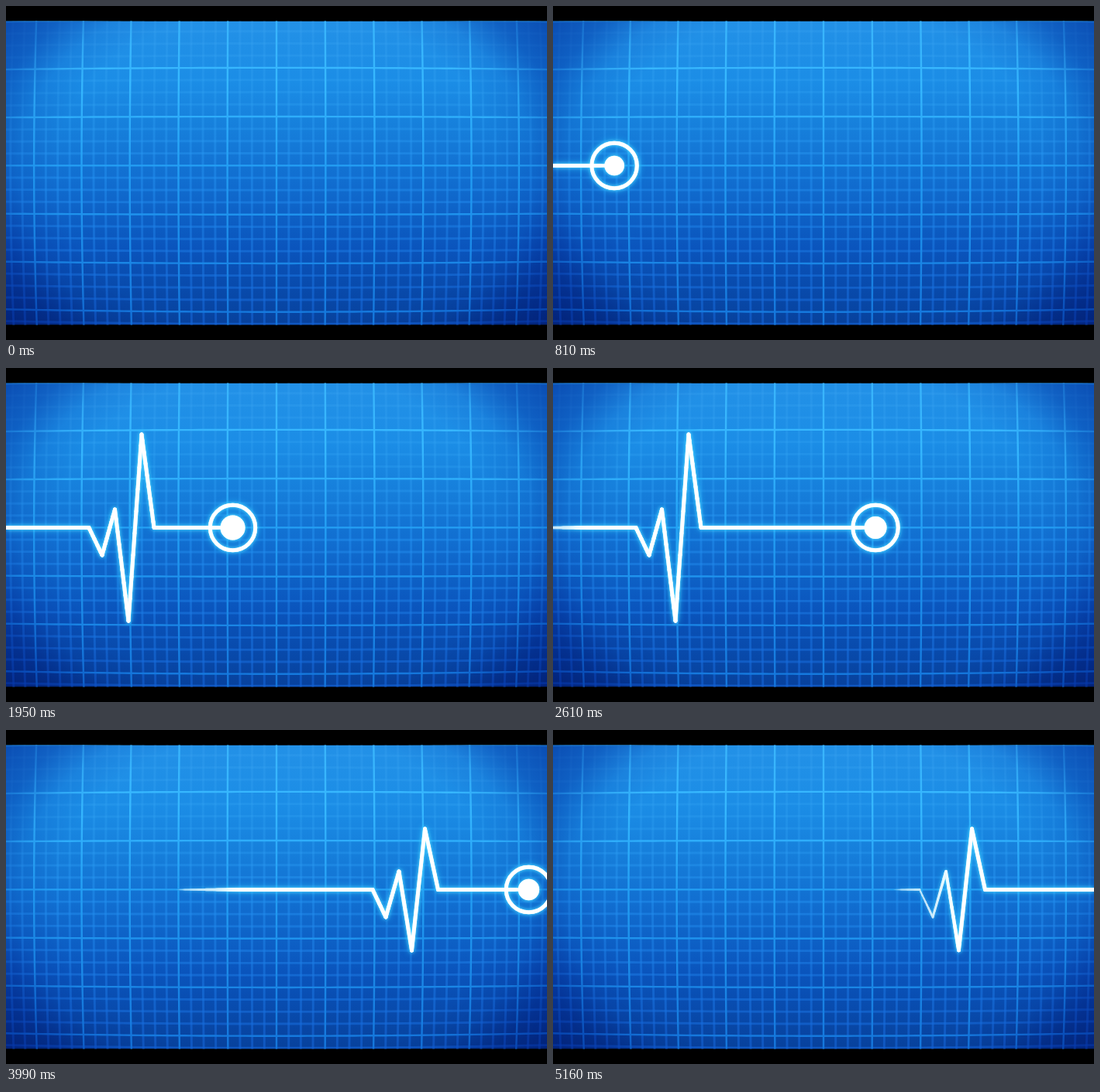
Write an HTML page with a canvas that moves like this. It is 698x432 px and loops after 5190 ms.

```html
<!DOCTYPE html>
<html lang="en">
<head>
<meta charset="utf-8">
<title>Heartbeat monitor</title>
<style>
  html, body { margin: 0; width: 100%; height: 100%; overflow: hidden; background: #000; }
  canvas { display: block; }
</style>
</head>
<body>
<canvas id="stage" width="698" height="432"></canvas>
<script>
const W = 698, H = 432, TOP = 19.5, BOTTOM = 412.5;
const LOOP = 5190, STEP = 30;
const SPEED = 0.1872, START = -72.5, TRAIL = 455;
const CX = 349, CY = 206.4, CELL = 63.4;
const BASE = 206.5, STROKE = 4.9, TAPER = 90;

const TRACE = [
  [-120, BASE], [107, BASE], [124, 242], [140.5, 183], [158, 327], [175, 86], [191, BASE],
  [473, BASE], [490, 242], [507, 183], [523.5, 285], [540.5, 128], [557.5, BASE], [1000, BASE]
];

const ctx = document.getElementById('stage').getContext('2d');

function layer() {
  const c = document.createElement('canvas');
  c.width = W;
  c.height = H;
  return c.getContext('2d');
}

function addStops(gradient, stops) {
  for (const [at, color] of stops) gradient.addColorStop(at, color);
  return gradient;
}

const vertical = (g, stops) => addStops(g.createLinearGradient(0, TOP, 0, BOTTOM), stops);

// Barrel distortion of a flat grid point, measured from the centre.
function bulge(u, v) {
  const x = CX + u * (1 - 1.3e-7 * u * u - 2.6e-7 * v * v);
  const y = CY + v * (1 - 1.4e-7 * u * u - 1.3e-7 * v * v);
  return [x, y];
}

function gridLine(g, at, upright) {
  const reach = upright ? 230 : 380;
  g.beginPath();
  for (let s = -reach; s <= reach; s += 10) {
    g.lineTo(...(upright ? bulge(at, s) : bulge(s, at)));
  }
  g.stroke();
}

function drawGrid(g, major) {
  for (let i = -24; i <= 24; i++) {
    if ((i % 4 === 0) !== major) continue;
    const at = i * CELL / 4;
    gridLine(g, at, true);
    if (Math.abs(i) <= 14) gridLine(g, at, false);
  }
}

function paintBackdrop() {
  const g = layer();
  g.fillStyle = '#000';
  g.fillRect(0, 0, W, H);
  g.save();
  g.beginPath();
  g.rect(0, TOP, W, BOTTOM - TOP);
  g.clip();

  g.fillStyle = vertical(g, [
    [0, '#2391e7'], [0.2, '#1b8de6'], [0.35, '#167fdb'],
    [0.52, '#116ed0'], [0.75, '#0a54bc'], [1, '#07419c']
  ]);
  g.fillRect(0, TOP, W, BOTTOM - TOP);

  g.lineWidth = 2.9;
  g.strokeStyle = vertical(g, [
    [0, 'rgba(60,165,242,.25)'], [0.25, 'rgba(50,165,245,.28)'],
    [0.5, 'rgba(35,145,240,.5)'], [1, 'rgba(20,100,215,.6)']
  ]);
  drawGrid(g, false);

  g.lineWidth = 2.4;
  g.strokeStyle = vertical(g, [
    [0, '#39b4fb'], [0.2, '#36b8ff'], [0.5, '#229df3'], [1, '#1476dc']
  ]);
  drawGrid(g, true);

  // Darken the corners while keeping them saturated.
  g.globalCompositeOperation = 'multiply';
  g.translate(W / 2, 215);
  g.scale(400, 300);
  g.fillStyle = addStops(g.createRadialGradient(0, 0, 0, 0, 0, 1.1), [
    [0, '#fff'], [0.65, '#fff'], [0.76, '#d8e8f5'], [0.87, '#7cabd8'], [1, '#4885c4']
  ]);
  g.fillRect(-1, -1, 2, 2);
  g.restore();
  return g.canvas;
}

function traceY(x) {
  const i = TRACE.findIndex(p => p[0] >= x);
  if (i < 1) return BASE;
  const [x0, y0] = TRACE[i - 1], [x1, y1] = TRACE[i];
  return y0 + (y1 - y0) * (x - x0) / (x1 - x0);
}

const backdrop = paintBackdrop();
const glowing = layer();

function drawTrace(g, tail, head) {
  const from = Math.max(tail, -20), to = Math.min(head, W + 20);
  if (to <= from) return;
  const xs = TRACE.map(p => p[0]).filter(x => x > from && x < to);
  for (let x = from; x < to; x += 2) xs.push(x);
  xs.push(to);
  xs.sort((a, b) => a - b);

  g.lineCap = 'round';
  for (let i = 1; i < xs.length; i++) {
    const x0 = xs[i - 1], x1 = xs[i];
    const y0 = traceY(x0), y1 = traceY(x1);
    const grow = Math.min(1, (x1 - tail) / TAPER);
    const steep = Math.abs(y1 - y0) / (Math.hypot(x1 - x0, y1 - y0) || 1);
    const shrink = Math.min(1, 0.7 + (head - x1) / 100);
    // Steep strokes thin out sooner than flat ones.
    g.lineWidth = STROKE * shrink * Math.pow(grow, 0.5 + 0.6 * steep);
    g.beginPath();
    g.moveTo(x0, y0);
    g.lineTo(x1, y1);
    g.stroke();
  }

  // Fade the thin end of the trail.
  g.globalCompositeOperation = 'destination-in';
  g.fillStyle = addStops(g.createLinearGradient(tail, 0, tail + TAPER, 0), [
    [0, 'rgba(0,0,0,0)'], [0.12, 'rgba(0,0,0,.35)'], [0.6, 'rgba(0,0,0,.6)'], [0.9, '#000']
  ]);
  g.fillRect(0, 0, W, H);
  g.globalCompositeOperation = 'source-over';
}

function drawHead(g, x, t) {
  const y = traceY(x);
  const dot = 14.2 + 1.8 * Math.cos((t - 1950) / 2900 * Math.PI * 2);
  g.fillStyle = '#fff';
  g.lineWidth = STROKE;
  g.beginPath();
  g.arc(x, y, 29.2, 0, Math.PI * 2);
  g.stroke();
  g.beginPath();
  g.arc(x, y, dot, 0, Math.PI * 2);
  g.fill();
}

function draw(t) {
  const head = START + SPEED * t;
  glowing.clearRect(0, 0, W, H);
  glowing.strokeStyle = '#fff';
  drawTrace(glowing, head - TRAIL, head);
  drawHead(glowing, head, t);

  ctx.drawImage(backdrop, 0, 0);
  ctx.save();
  for (const [blur, color] of [[10, '#22bcff'], [4, '#5cdcff']]) {
    ctx.shadowBlur = blur;
    ctx.shadowColor = color;
    ctx.drawImage(glowing.canvas, 0, 0);
  }
  ctx.restore();
}

const begin = performance.now();

function tick() {
  const t = (performance.now() - begin) % LOOP;
  draw(Math.floor(t / STEP) * STEP);
  requestAnimationFrame(tick);
}
tick();
</script>
</body>
</html>
```
